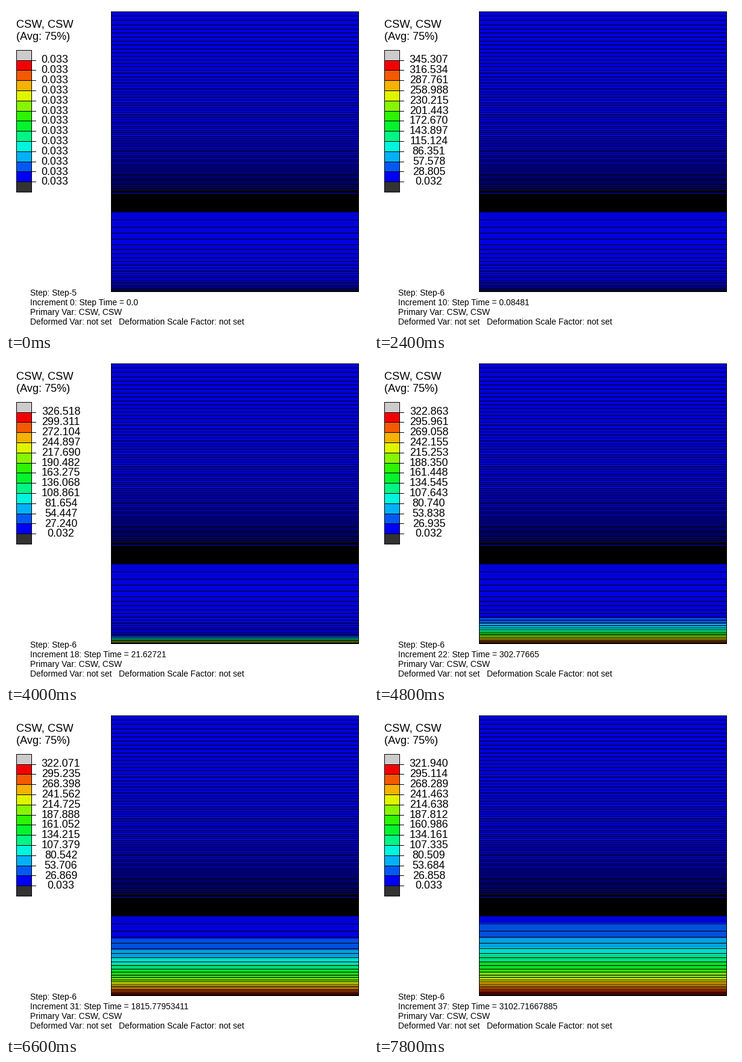
A matplotlib script that plays this animation: 600 by 537 pixels, repeating every 8 s.

```python
import math

import matplotlib.pyplot as plt
import numpy as np
from matplotlib.animation import FuncAnimation
from matplotlib.patches import Rectangle

W, H, DPI = 600, 537, 100
FRAMES, INTERVAL = 40, 200
TOP, SEAM, BOTTOM, LEFT, RIGHT = 9, 341, 473, 174, 584
KEY_Y, KEY_H = 73.2, 16.8
BANDS = 12

# Solver history: increment, step time, peak value above its final level
HISTORY = np.array([
    (1, 8.29e-5, 30), (10, 0.08481, 23.507), (18, 21.62721, 4.7182),
    (22, 302.77665, 1.0631), (27, 1263.82113, 0.4038),
    (34, 2382.84748088, 0.2013), (37, 3102.71667885, 0.14)])
PEAK_END = 321.8


def rainbow(k):
    """Colour of band k, running blue, cyan, green, yellow, red."""
    p = 4 * k / (BANDS - 1)
    return np.clip((p - 2, min(p, 4 - p), 2 - p), 0, 1)


COLORS = np.array([rainbow(k) for k in range(BANDS)])


def history(inc, column):
    return math.exp(np.interp(inc, HISTORY[:, 0], np.log(HISTORY[:, column])))


def step_time(inc):
    return history(inc, 1) if inc else 0.0


def time_text(inc):
    t = step_time(inc)
    if t == 0:
        return "0.0"
    if t < 1e-3:
        return f"{t:.4E}"
    return f"{t:.8f}" if inc > 27 else f"{t:.5f}"


def limits(inc):
    if inc == 0:
        return 0.033, 0.033
    low = 0.03249 if inc < 25 else 0.03255
    return low, PEAK_END + history(inc, 2)


def graded(start, end, first, last):
    """Element edges whose spacing shrinks geometrically."""
    span = end - start
    ratio = (span - first) / (span - last)
    y, gap = start, first
    while y < end:
        yield int(y)
        y += gap
        gap *= ratio


ROWS = np.arange(TOP, BOTTOM + 1)
MESH = np.isin(ROWS, [*graded(TOP, SEAM, 7.5, 0.5),
                      *graded(SEAM + 0.6, BOTTOM, 12.85, 1.4), BOTTOM])


def field(inc):
    """Row colours of the model: diffusion upwards from the bottom edge."""
    depth = 2.63 * max(step_time(inc), 1e-9) ** 0.45
    level = np.array([math.erfc((BOTTOM - y) / depth) for y in ROWS])
    band = np.minimum((level * BANDS).astype(int), BANDS - 1)
    rgb = COLORS[band] * 0.87
    rgb[MESH] = 0
    return rgb[:, None, :]


fig = plt.figure(figsize=(W / DPI, H / DPI), dpi=DPI, facecolor="white")
ax = fig.add_axes([0, 0, 1, 1])


def box(x, y, w, h, color):
    ax.add_patch(Rectangle((x, y), w, h, fc=color, ec="none", lw=0,
                           antialiased=False))


def label(x, y, px, s="", ha="left"):
    return ax.text(x, y, s, fontsize=px * 72 / DPI, ha=ha, va="baseline",
                   family="Liberation Sans", color="black")


box(LEFT, TOP, RIGHT - LEFT + 1, BOTTOM - TOP + 1, "black")
model = ax.imshow(field(0), extent=(LEFT + 1, RIGHT, BOTTOM + 1, TOP),
                  interpolation="nearest", aspect="auto", zorder=2)
ax.set_xlim(0, W)
ax.set_ylim(H, 0)
ax.axis("off")

label(17, 35.5, 18.4, "CSW, CSW")
label(17, 56.5, 18.2, "(Avg: 75%)")

edges = [int(KEY_Y + KEY_H * k) for k in range(BANDS + 3)]
box(17, edges[0], 26, edges[-1] - edges[0] + 1, "black")
swatches = [(0.8, 0.8, 0.8), *COLORS[::-1] * 0.96, (0.2, 0.2, 0.2)]
for y0, y1, color in zip(edges, edges[1:], swatches):
    box(18, y0 + 1, 24, y1 - y0 - 1, color)
for y in edges[1:-1]:
    box(43, y, 7, 1, "black")

values = [label(81, 94.4 + 16.83 * k, 17.9, ha="center")
          for k in range(BANDS + 1)]
step_line, inc_line, var_line, deform_line = [
    label(40, 479.7 + 16 * k, 13.86) for k in range(4)]
var_line.set_text("Primary Var: CSW, CSW")
deform_line.set_text(
    "Deformed Var: not set   Deformation Scale Factor: not set")


def draw(i):
    inc = max(i - 2, 0)
    low, high = limits(inc)
    x = 81 + 5 * (len(f"{high:.3f}") - 5)
    for k, text in enumerate(values):
        text.set_text(f"{high - (high - low) * k / BANDS:.3f}")
        text.set_x(x)
    if i < 2:
        step_line.set_text("Step: Step-5")
        inc_line.set_text(f"Increment {i}: Step Time = {i:.1f}")
    else:
        step_line.set_text("Step: Step-6")
        inc_line.set_text(f"Increment {inc}: Step Time = {time_text(inc)}")
    model.set_data(field(inc))
    return [model, step_line, inc_line, *values]


anim = FuncAnimation(fig, draw, frames=FRAMES, interval=INTERVAL,
                     repeat=True, repeat_delay=0, blit=False)
plt.show()
```
